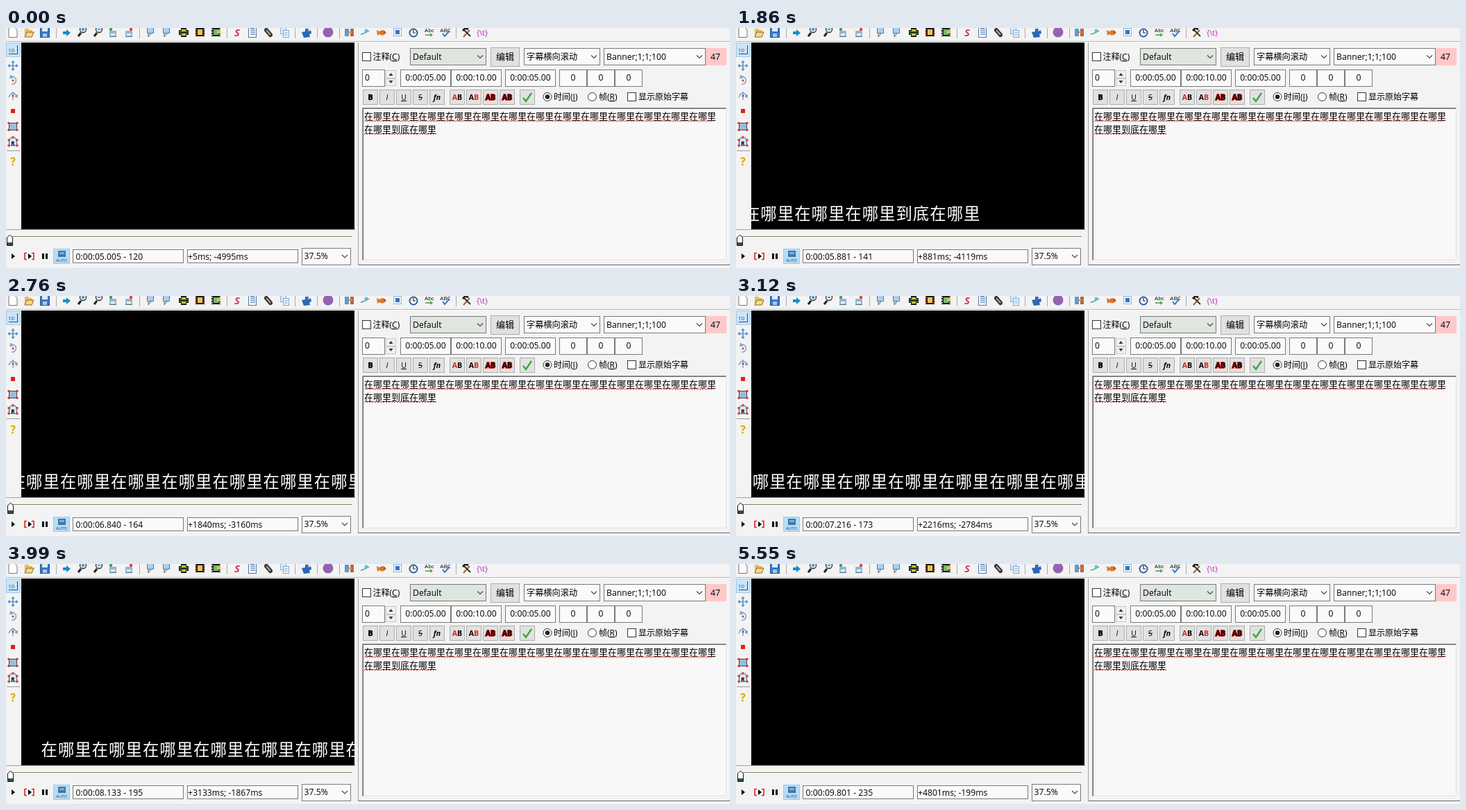
Animation, 1043 px wide and 347 px high, one loop 5.58 s. Source, as an HTML page:

```html
<!DOCTYPE html>
<html lang="zh-CN">
<head>
<meta charset="utf-8">
<title>Banner scroll</title>
<style>
html, body { margin: 0; width: 100%; height: 100%; overflow: hidden; background: #f3f3f3; }
svg { display: block; }
text { font-family: "Open Sans", "Noto Sans CJK SC", "Noto Sans CJK", sans-serif; white-space: pre; }
#banner { font-family: "Noto Sans CJK SC", "Noto Sans CJK", sans-serif; font-weight: 300; letter-spacing: 1px; fill: #fff; }
</style>
</head>
<body>
<svg id="stage" width="1043" height="347" viewBox="0 0 1043 347"></svg>
<script>
const LOOP = 5580;
const WORD = '在哪里';
const LINE1 = WORD.repeat(13), LINE2 = WORD + '到底' + WORD;

// Markup helpers
const rect = (x, y, w, h, fill, extra = '') => `<rect x="${x}" y="${y}" width="${w}" height="${h}" fill="${fill}" ${extra}/>`;
const box = (x, y, w, h, fill = '#fafafa', stroke = '#7a7a7a') =>
  rect(x + .5, y + .5, w - 1, h - 1, fill, `stroke="${stroke}"`);
const path = (d, stroke = '#222', width = 1, fill = 'none', extra = '') =>
  `<path d="${d}" stroke="${stroke}" stroke-width="${width}" fill="${fill}" ${extra}/>`;
const shape = (d, fill) => path(d, 'none', 0, fill);
const circle = (x, y, r, fill, stroke = 'none', width = 1) =>
  `<circle cx="${x}" cy="${y}" r="${r}" fill="${fill}" stroke="${stroke}" stroke-width="${width}"/>`;
const text = (x, y, s, size = 12.2, extra = '') => `<text x="${x}" y="${y}" font-size="${size}" ${extra}>${s}</text>`;
const centred = (x, y, s, size = 12.2, extra = '') => text(x, y, s, size, `text-anchor="middle" ${extra}`);
const at = (x, y, s) => `<g transform="translate(${x} ${y})">${s}</g>`;
const chevron = (x, y) => path(`M${x - 4} ${y - 2}l4 4 4-4`, '#444', 1.1);
const combo = (x, y, w, h, label, fill) =>
  box(x, y, w, h, fill) + text(x + 4, y + 17, label) + chevron(x + w - 9, y + h / 2);
const key = s => `(<tspan text-decoration="underline">${s}</tspan>)`;
const zigzag = (x, y, end, colour) =>
  path(`M${x} ${y}` + 'l2 -2l2 2'.repeat((end - x) / 4), colour, 1);

// Toolbar icons, each centred on x = 0 and cut by the top edge
const page = '<path d="M-6 -2V13.500H6V3L2-2Z" fill="#fff" stroke="#777"/>';
const lens = sign => path('M-2 7L-6 12', '#222', 3) + circle(1, 2, 4.5, '#d9edf8', '#333', 1.3) + path(sign, '#2878c8', 1.4);
const clip = (a, b) => rect(-5, 4, 10, 9, '#8eb8d5', 'rx="1"') + rect(-3, 8, 6, 3, '#e9f2f5') +
  circle(a, 2, 2.2, b) + path('M-5 12.500H5', '#52778d');
const bubble = path('M-4.500 -2V7.500H4.500V-2', '#4a7eb0', 1, '#a9d0f0') + path('M-3 8V13L1 8', '#666', 1, '#ddd');
const film = (frame, edge) => rect(-6, 0, 13, 12, '#181818') + rect(-3, 2, 7, 8, frame) +
  path('M-5 1V12M6 1V12', edge, 1.4, 'none', 'stroke-dasharray="2 2"');
const icons = [
  [10, page],
  [33, shape('M-6 13V1H-1L1 3H5V6L7 6L4 13Z', '#e8bd58') + path('M-6 13L-3 6H7L4 13Z', '#876624', 1, '#f8d987')],
  [56, box(-7, -1, 14, 15, '#3977ca', '#22569b') + rect(-4, 0, 8, 5, '#dcecff') + rect(-3, 8, 6, 5, '#a7c6eb')],
  [87, shape('M-5 5H0V2L6 7L0 12V9H-5Z', '#168bd2')],
  [110, lens('M-1 2H3M1 0V4')],
  [133, lens('M-1 2H3')],
  [154, clip(-3, '#4a9a56')],
  [177, clip(3, '#d94444')],
  [208, bubble],
  [231, bubble],
  [256, shape('M-4 0H4V3H7V10H4V13H-4V10H-7V3H-4Z', '#182018') + rect(-3, 2, 6, 3, '#e2c53c') +
    rect(-3, 8, 6, 3, '#e2c53c') + path('M-6 5H6M-6 8H6', '#39b54a', 1.2)],
  [279, film('#e8c45c', '#e05535')],
  [302, film('#6fba72', '#eee') + rect(2, 3, 5, 5, '#e4c13f')],
  [333, centred(0, 12, 'S', 15, 'fill="#c83d64" font-style="italic" font-weight="bold"')],
  [355, box(-6, -2, 12, 16, '#f5fbff', '#4777a8') + path('M-3 3H4M-3 6H4M-3 9H4', '#315f91') + rect(-3, -1, 6, 2, '#315f91')],
  [378, path('M-3 3L3 10', '#333', 6, 'none', 'stroke-linecap="round"') + path('M-3 3L3 10', '#aaa', 2)],
  [401, box(-6, -2, 9, 11, '#d6eaf9', '#8fb3d4') + box(-2, 3, 9, 11, '#eef7ff', '#7ea7cc') + path('M0 7H5M0 10H5', '#7ea7cc')],
  [433, shape('M-7 6L-2 5L-2 1H3L2 5L6 3L7 8L4 9L5 13L-4 14Z', '#2968b5')],
  [464, circle(0, 6, 7.5, '#9562b1')],
  [495, rect(-7, 1, 6, 11, '#5a9cd1') + rect(1, 1, 5, 11, '#b66446') + path('M-2 6H4', '#e38a35', 2)],
  [517, path('M-6 9Q-1 8 6 4', '#46aebb', 1.6) + circle(2, 4, 2.5, '#69bdc5')],
  [541, shape('M-7 3L-3 5Q3 0 7 7Q2 13-3 9L-6 11Z', '#d87931') + circle(4, 6, 1, '#5b321f')],
  [564, box(-6, 0, 12, 12, '#e8f3fc', '#91b9d9') + rect(-3, 3, 6, 6, '#3975c4')],
  [587, circle(0, 7, 5.500, '#fff', '#2d5c9d', 2) + path('M0 3V7H3', '#222', 1.2)],
  [610, centred(0, 6, 'Abc', 8) + path('M-6 10H4M1 8L4 10L1 12', '#47a146', 1.3)],
  [633, centred(0, 6, 'ABC', 8) + path('M-4 8L-1 12L6 4', '#3578cf', 2)],
  [664, path('M-5 13L4 3', '#9b6530', 2) + path('M-5 2L5 12', '#333', 2) + path('M-6 4L-2 0L2 2', '#222', 3)],
  [686, centred(0, 11, '{\\t}', 11, 'fill="#b52ab5"')]
];
const toolbar = icons.map(([x, s]) => at(x, 0, s)).join('') +
  [72, 192, 318, 416, 448, 480, 648].map(x => rect(x, 0, 1, 15, '#aaa')).join('');

// Visual tools down the left side
const tools =
  box(0, 21, 21, 21, '#cce4f7', '#a5cdea') + text(3, 35, '10', 8, 'fill="#205080"') + path('M4 37.500H17M16.500 25V38', '#205080') +
  path('M10 48V61M3.500 54.500H16.500M8 50L10 48L12 50M8 59L10 61L12 59M5.500 52.500L3.500 54.500L5.500 56.500M14.500 52.500L16.500 54.500L14.500 56.500', '#5b97d2', 1.7) +
  path('M6 71A5.500 5.500 0 1 1 8 81M7 68L6 72L10 72', '#6ba3cc', 1.4) + circle(10, 76, 1.4, '#c33') +
  path('M4 100Q10 88 16 100M10 92V104M13 99L16 100L16 96', '#6ba3cc', 1.4) + circle(10, 98, 1.5, '#c33') +
  rect(7, 117, 6, 6, '#e11d1d') +
  box(4, 137, 12, 11, '#9abddb', '#40444a') + path('M4 136V149M16 136V149', '#d33', 3, 'none', 'stroke-dasharray="3 7"') +
  path('M4.500 170V164Q5 158 10 158Q15 158 15.500 164V170Z', '#41739e', 1.2, '#d7e8f5') +
  centred(10, 170, 'R', 8, 'font-weight="bold"') +
  [[4, 170], [16, 170], [4, 162], [16, 162], [10, 158]].map(([x, y]) => rect(x - 1.5, y - 1.5, 3, 3, '#d33')).join('') +
  rect(1, 177, 19, 1, '#999') +
  centred(10, 199, '?', 16, 'fill="#d9a900" font-weight="bold"');

const frame =
  rect(0, 0, 1043, 347, '#f3f3f3') + rect(0, 19, 1043, 1, '#b5b9ad') + rect(0, 20, 1043, 1, '#fff') +
  rect(22, 21, 480, 270, '#000') + rect(0, 291, 503, 1, '#a0a0a0') +
  rect(507, 21, 1, 321, '#a0a0a0') + rect(507, 342, 536, 1, '#696969');

const transport =
  rect(7, 301, 491, 1, '#77805f') + rect(7, 302, 491, 1, '#fff') +
  rect(23, 319, 22, 21, '#dbeaf7', 'id="hover"') +
  shape('M8 326L13 330L8 334Z', '#000') +
  path('M30 325.500H27V334.500H30M37 325.500H40V334.500H37', '#e02222', 1.6) + shape('M32 326L37 330L32 334Z', '#000') +
  rect(52, 326, 3, 8, '#000') + rect(57, 326, 3, 8, '#000') +
  box(68, 319, 24, 22, '#b9dcf5', '#99cdef') + rect(75, 322, 11, 9, '#3d78a8') + rect(77, 324, 7, 3, '#7fb0d3') +
  centred(80, 338, 'AUTO', 6, 'fill="#153a63"') +
  box(96, 320, 160, 20) + box(261, 320, 160, 20) +
  text(100.500, 335, '', 12.2, 'id="clock"') + text(262, 335, '', 12.2, 'id="offset"') +
  box(426, 318, 71, 25) + text(429.500, 334, '37.5%') + chevron(488, 330) +
  `<g id="knob">${path('M1.500 314.500V303L5.500 299L9.500 303V314.500Z', '#111', 1, '#fff')}${rect(2, 310, 7, 4, '#315648')}</g>`;

const field = (x, w, label) => box(x, 60, w, 25) + centred(x + w / 2, 76, label);
const styleButton = (x, label, extra, fill = '#e1e1e1') =>
  box(x, 89, 22, 22, fill, '#adadad') + centred(x + 11, 104, label, 10.500, extra);
const bold = 'font-weight="bold"';
const redA = '<tspan fill="#e02020">A</tspan>B', redB = 'A<tspan fill="#e02020">B</tspan>';
const redEdge = 'font-weight="bold" stroke="#e02020" stroke-width="1.8" paint-order="stroke"';

const editor =
  box(513, 35, 13, 13, '#fff', '#333') + text(528.500, 46, '注释' + key('C'), 12) +
  combo(582, 29, 110, 25, 'Default', '#dfe5df') +
  box(698, 28, 42, 28, '#e1e1e1', '#adadad') + centred(719, 46, '编辑', 13) +
  combo(746, 29, 110, 25, '字幕横向滚动') + combo(861, 29, 147, 25, 'Banner;1;1;100') +
  rect(1008, 29, 30, 25, '#ffc8c8') + centred(1022, 46, '47') +
  box(513, 60, 33, 25) + text(517, 76, '0') +
  box(547, 61, 15, 12, '#f0f0f0', '#c8c8c8') + box(547, 73, 15, 11, '#f0f0f0', '#c8c8c8') +
  shape('M551.500 69L554.500 65L557.500 69ZM551.500 76L554.500 80L557.500 76Z', '#333') +
  field(568, 73, '0:00:05.00') + field(641, 73, '0:00:10.00') + field(719, 73, '0:00:05.00') +
  [797, 837, 877].map(x => field(x, 40, '0')).join('') +
  styleButton(514, 'B', 'font-weight="bold" stroke="#000" stroke-width=".6"') + styleButton(538, 'I', 'font-style="italic"') +
  styleButton(562, 'U', 'text-decoration="underline"') + styleButton(586, 'S', 'text-decoration="line-through"') +
  styleButton(610, 'fn', 'font-style="italic" font-weight="bold"') +
  styleButton(639, redA, bold) + styleButton(663, redB, bold) + styleButton(687, 'AB', redEdge) + styleButton(711, 'AB', redEdge) +
  styleButton(740, '', '') + path('M745 101L749 106L757 94', '#3fa63f', 2.5) +
  circle(780, 99.500, 6, '#fff', '#333') + circle(780, 99.500, 3.2, '#222') + text(789, 104, '时间' + key('I'), 12) +
  circle(844.500, 99.500, 6, '#fff', '#333') + text(854, 104, '帧' + key('R'), 12) +
  box(895, 93, 13, 13, '#fff', '#333') + text(911, 104, '显示原始字幕', 12) +
  rect(513, 115, 526, 222, '#f8f8f8') + path('M513.500 336V115.500H1038', '#a0a0a0') + path('M514.500 335V116.500H1037', '#696969') +
  path('M514 335.500H1037.500V117', '#ddd') +
  text(516, 131.500, LINE1, 13) + text(516, 150.500, LINE2, 13) +
  zigzag(516, 135.500, 1023, '#e03030') + zigzag(516, 154, 620, '#b03030');

// The nested svg clips the banner to the video; its style adds 1px between characters
const SIZE = 23.4, PITCH = SIZE + 1;
const banner = `<svg x="22" y="21" width="480" height="270">${text(0, 256, LINE1 + LINE2, SIZE, 'id="banner"')}</svg>`;

document.getElementById('stage').innerHTML = frame + toolbar + tools + banner + transport + editor;
const [bannerText, clock, offset, knob, hover] =
  ['banner', 'clock', 'offset', 'knob', 'hover'].map(id => document.getElementById(id));

function draw(now) {
  const t = Math.floor((now % LOOP) / 30) * 30;
  const videoFrame = Math.max(120, 126 + Math.floor((t - 1260) / 39.36 + .05));
  const ms = Math.round(videoFrame * 1001 / 24), elapsed = ms - 5000;
  clock.textContent = `0:00:0${(ms / 1000).toFixed(3)} - ${videoFrame}`;
  offset.textContent = `+${elapsed}ms; -${5000 - elapsed}ms`;
  // The banner enters from the left at one script pixel per millisecond, shown at 37.5%
  bannerText.setAttribute('x', elapsed * .375 - PITCH * (LINE1 + LINE2).length + .5);
  knob.setAttribute('transform', `translate(${videoFrame >= 160 ? 1 : 0} 0)`);
  hover.setAttribute('opacity', t >= 750 && t < 1290 ? Math.min(1, (t - 720) / 150) : 0);
}

const start = performance.now();
function tick() {
  draw(performance.now() - start);
  requestAnimationFrame(tick);
}
tick();
</script>
</body>
</html>
```
